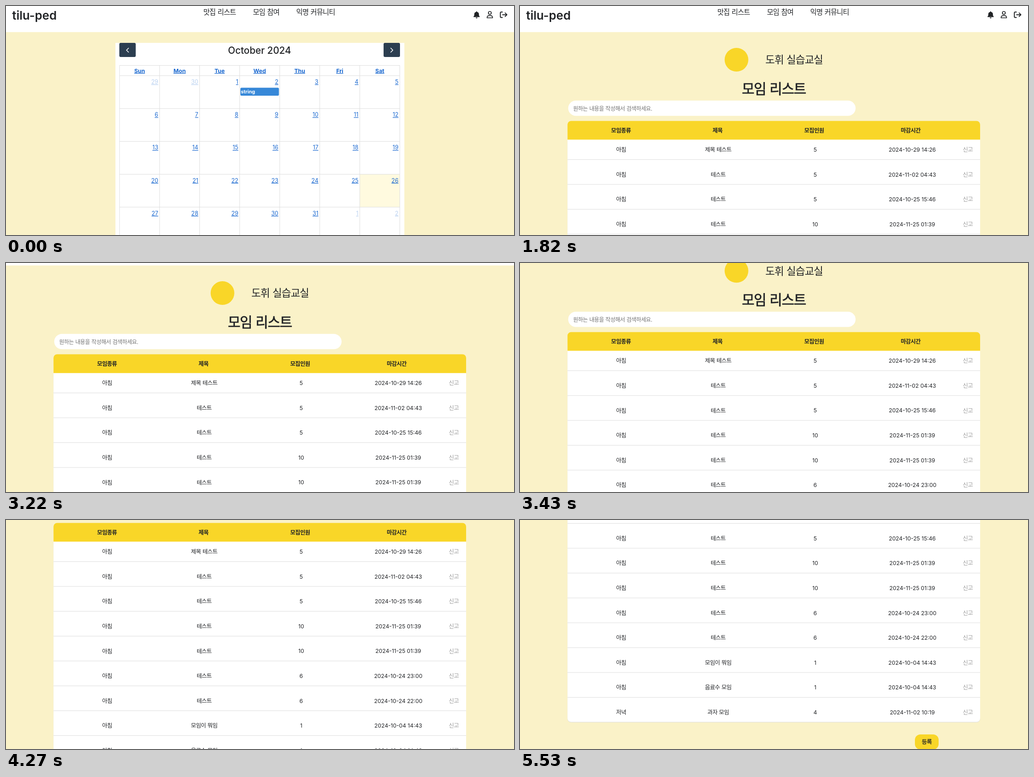
An HTML page that plays this animation: 1114x503 px, repeating every 8.05 s.

```html
<!DOCTYPE html>
<html lang="ko">
<head>
<meta charset="utf-8">
<style>
  html, body { margin: 0; height: 100%; overflow: hidden; background: #faf2c8; }
  svg { display: block; width: 100vw; height: 100vh; }
  text { font-family: Inter, "Noto Sans CJK KR", "Noto Sans CJK", sans-serif; }
  .hangul { letter-spacing: -.045em; word-spacing: .045em; }
  /* thickens regular Hangul to a medium weight */
  .hangul[font-weight="500"] { stroke: #212326; stroke-width: .024em; }
  .link { text-decoration: underline; }
</style>
</head>
<body>
<svg viewBox="0 0 1114 503">
  <rect width="1114" height="503" fill="#faf2c8"/>
  <g id="page">
    <g id="header"></g>
    <g id="calendar"></g>
    <g id="list"></g>
  </g>
</svg>
<script>
const LOOP = 8050, TICK = 70, LIST_AT = 1820;
const INK = '#212326', LINK = '#1b69d0', YELLOW = '#f9d628', LINE = '#dddddd';
const byId = id => document.getElementById(id);

const rect = (x, y, w, h, fill, r = 0) =>
  `<rect x="${x}" y="${y}" width="${w}" height="${h}" rx="${r}" fill="${fill}"/>`;
const stroke = (d, color, width) =>
  `<path d="${d}" fill="none" stroke="${color}" stroke-width="${width}" stroke-linecap="round" stroke-linejoin="round"/>`;

// y is the vertical middle of the glyphs
function text(s, x, y, size, { fill = INK, weight = 400, anchor = 'middle', link = false, opacity = 1 } = {}) {
  const classes = [/[가-힣]/.test(s) && 'hangul', link && 'link'].filter(Boolean).join(' ');
  return `<text x="${x}" y="${y + size * .37}" font-size="${size}" font-weight="${weight}" fill="${fill}"` +
    ` text-anchor="${anchor}" opacity="${opacity}" class="${classes}">${s}</text>`;
}

function header() {
  return rect(0, 0, 1114, 57.3, '#fff') +
    text('tilu-ped', 13.5, 20, 26, { weight: 600, anchor: 'start' }) +
    text('맛집 리스트', 468.5, 13, 15.4) +
    text('모임 참여', 570.5, 13, 15.4) +
    text('익명 커뮤니티', 679, 13, 15.4) +
    `<path fill="${INK}" d="M1030.9 12.9a1.1 1.1 0 0 1 2.2 0c2.5.5 4 2.5 4 5v1.5c0 1.6.7 2.6 1.6 3.6.4.6 0 1.3-.6 1.3h-12.2c-.6 0-1-.7-.6-1.3.9-1 1.6-2 1.6-3.6v-1.5c0-2.5 1.5-4.5 4-5zM1030 25.2h4a2 2 0 0 1-4 0z"/>` +
    stroke('M1057.8 15.2a3.2 3.2 0 1 0 6.4 0a3.2 3.2 0 1 0-6.4 0M1055 26c0-3 1.8-4.8 4.3-4.8h3.4c2.5 0 4.3 1.8 4.3 4.8z', INK, 1.7) +
    stroke('M1088.5 13.2h-2.5a2 2 0 0 0-2 2v8a2 2 0 0 0 2 2h2.5M1089 19.2h9M1094.5 15.2l4 4-4 4', INK, 1.9);
}

function calendar() {
  const left = 249, top = 153, colW = 87.8, rowH = 72.2, right = left + 7 * colW;
  let out = rect(240, 81, 633.5, 422, '#fff') +
    rect(248.5, 81, 36, 31, '#2c3e50', 3) + stroke('M268.7 92.5l-4.5 4.5 4.5 4.5', '#fff', 1.6) +
    rect(828, 81, 36, 31, '#2c3e50', 3) + stroke('M843.8 92.5l4.5 4.5-4.5 4.5', '#fff', 1.6) +
    text('October 2024', 556, 97, 20.8, { weight: 500 }) +
    rect(left + 6 * colW, top + 3 * rowH, colW, rowH, '#fffadf');

  let grid = `M${left} 130.5H${right}`;
  for (let r = 0; r < 5; r++) grid += `M${left} ${top + r * rowH}H${right}`;
  for (let c = 0; c < 8; c++) grid += `M${left + c * colW} 130.5V503`;
  out += `<path d="${grid}" stroke="${LINE}" fill="none"/>`;

  ['Sun', 'Mon', 'Tue', 'Wed', 'Thu', 'Fri', 'Sat'].forEach((day, c) => {
    out += text(day, left + (c + .5) * colW, 142, 12.4, { fill: LINK, weight: 700, link: true });
  });
  for (let i = 0; i < 35; i++) {
    const day = i < 2 ? 29 + i : (i - 2) % 31 + 1;
    const x = left + (i % 7 + 1) * colW - 3, y = top + 13.5 + Math.floor(i / 7) * rowH;
    out += text(day, x, y, 12.4, { fill: LINK, anchor: 'end', link: true, opacity: i < 2 || i > 32 ? .3 : 1 });
  }
  return out + rect(514, 179.5, 84.5, 17.5, '#3788d8', 2.5) +
    text('string', 515, 188, 10.9, { fill: '#fff', weight: 700, anchor: 'start' });
}

const meetings = [
  ['아침', '제목 테스트', 5, '2024-10-29 14:26'],
  ['아침', '테스트', 5, '2024-11-02 04:43'],
  ['아침', '테스트', 5, '2024-10-25 15:46'],
  ['아침', '테스트', 10, '2024-11-25 01:39'],
  ['아침', '테스트', 10, '2024-11-25 01:39'],
  ['아침', '테스트', 6, '2024-10-24 23:00'],
  ['아침', '테스트', 6, '2024-10-24 22:00'],
  ['아침', '모임이 뭐임', 1, '2024-10-04 14:43'],
  ['아침', '음료수 모임', 1, '2024-10-04 14:43'],
  ['저녁', '과자 모임', 4, '2024-11-02 10:19'],
];

function list() {
  const rowH = 54.6, left = 104.2, width = 904.8;
  let out = `<circle cx="474.7" cy="118" r="26" fill="${YELLOW}"/>` +
    text('도휘 실습교실', 601, 118, 22.8) +
    text('모임 리스트', 556.5, 182, 30.2, { weight: 500 }) +
    rect(105.7, 207.8, 630.2, 33.4, '#fff', 16.7) +
    text('원하는 내용을 작성해서 검색하세요.', 116.5, 225, 12.2, { fill: '#757575', anchor: 'start' }) +
    rect(left, 270, width, 559, LINE, 8) +
    rect(left, 270, width, 558, '#fff', 8) +
    `<path d="M${left} 293.6V260.4a8 8 0 0 1 8-8h${width - 16}a8 8 0 0 1 8 8V293.6z" fill="${YELLOW}"/>`;
  ['모임종류', '제목', '모집인원', '마감시간'].forEach((s, i) => {
    out += text(s, 221.5 + i * 211.7, 273, 12.4, { weight: 600 });
  });
  meetings.forEach(([kind, title, count, deadline], i) => {
    const y = 315.5 + i * rowH;
    out += text(kind, 221.7, y, 12.5) + text(title, 434.6, y, 12.5) +
      text(count, 647.4, y, 12.2) + text(deadline, 860.2, y, 12.2) +
      text('신고', 982, y, 12.5, { fill: '#999' });
    if (i < meetings.length - 1) out += rect(left, y + 21.3, width, 1, LINE);
  });
  return out + rect(866, 855.5, 52, 33, YELLOW, 12) + text('등록', 892, 872, 12.5, { weight: 500 });
}

// start, last step, scroll before, scroll after
const flicks = [
  [3010, 3710, 0, 133],
  [3920, 4270, 133, 246],
  [4410, 4620, 246, 312.5],
  [5180, 5530, 312.5, 384.5],
];
const ease = p => 1 - (1 - p ** 1.5) ** 2;

function scrollAt(t) {
  let y = 0;
  for (const [start, end, from, to] of flicks) {
    if (t < start) break;
    y = from + (to - from) * ease(Math.min(1, (t - start + TICK) / (end - start + TICK)));
  }
  return y;
}

byId('header').innerHTML = header();
byId('calendar').innerHTML = calendar();
byId('list').innerHTML = list();

const began = performance.now();
function draw() {
  const t = Math.floor((performance.now() - began) % LOOP / TICK) * TICK;
  byId('calendar').style.display = t < LIST_AT ? '' : 'none';
  byId('list').style.display = t < LIST_AT ? 'none' : '';
  byId('page').setAttribute('transform', `translate(0 ${-scrollAt(t)})`);
  requestAnimationFrame(draw);
}
draw();
</script>
</body>
</html>
```
